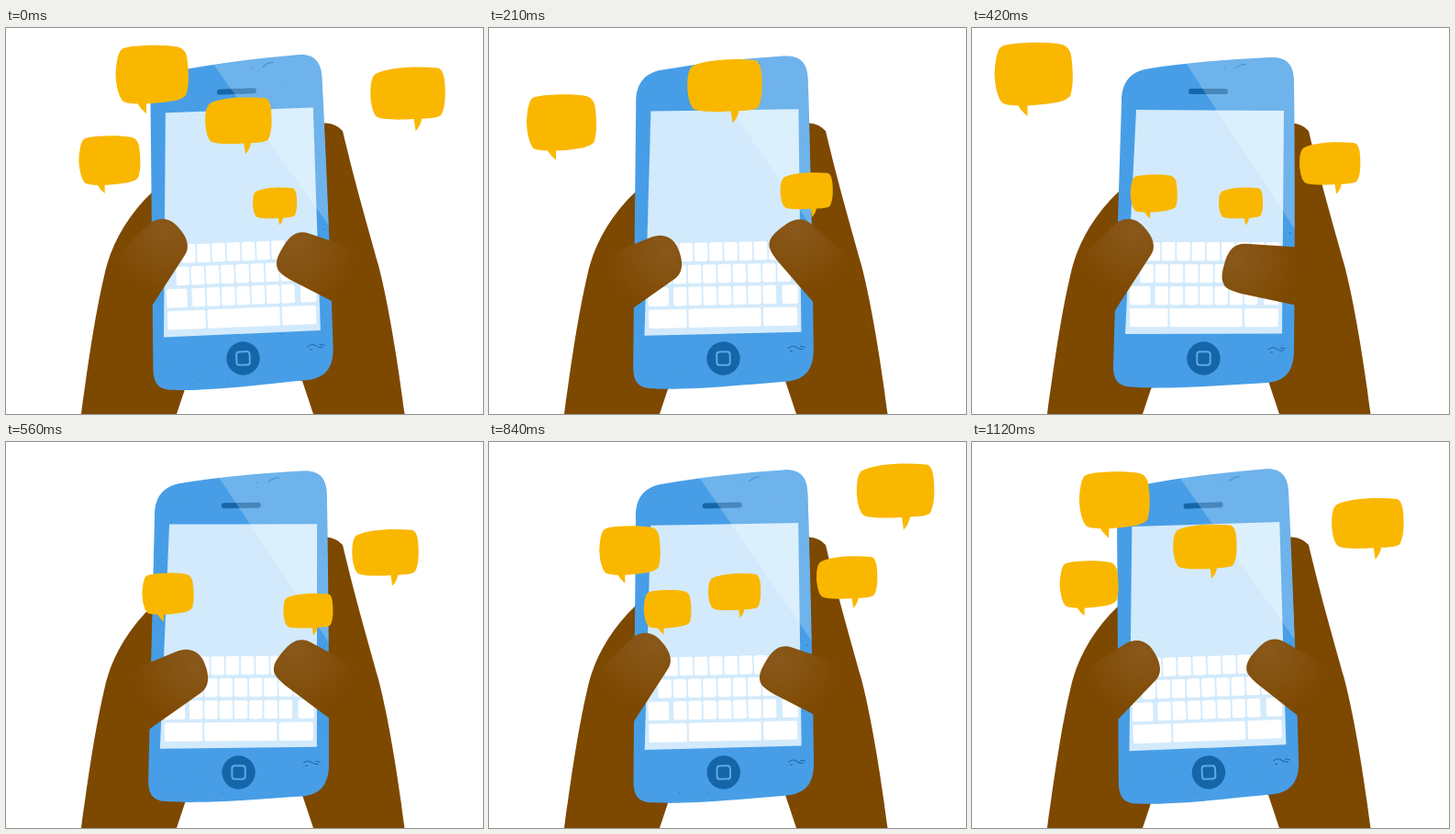
An HTML page for the animation above (1.19 s loop, 520x420 px).

```html
<!DOCTYPE html>
<html lang="en">
<head>
<meta charset="utf-8">
<title>Texting</title>
<style>
  html, body { margin: 0; width: 100%; height: 100%; overflow: hidden; background: #fff; }
  svg { display: block; width: 520px; height: 420px; }
</style>
</head>
<body>
<svg viewBox="0 0 520 420" xmlns="http://www.w3.org/2000/svg">
  <defs>
    <radialGradient id="shadeL" gradientUnits="userSpaceOnUse" cx="176" cy="222" r="68">
      <stop offset="0" stop-color="#8a591c"/><stop offset="1" stop-color="#7d4800"/>
    </radialGradient>
    <radialGradient id="shadeR" gradientUnits="userSpaceOnUse" cx="316" cy="238" r="68">
      <stop offset="0" stop-color="#8a591c"/><stop offset="1" stop-color="#7d4800"/>
    </radialGradient>
    <path id="body" d="M163 80C163 61 171 48 191 44.500C232 38 280 34 325 32C343 31 351 40 351 58C352 150 352 250 351 350C351 373 342 384 322 386C285 388 245 391.500 205 391.500C195 392 180 391 172 390.500C160 389 154 384 154 368C157 270 160 180 163 80Z"/>
    <clipPath id="inBody"><use href="#body"/></clipPath>
    <path id="bubbleL" d="M-33 -31C-15 -35 15 -35 31 -32Q40 -29 41 -17C43 0 43 12 40 23Q38 28 25 31Q8 34 -7 34.500L-7 46Q-14 40 -17 34.500Q-32 34 -35 31Q-42 22 -43 0Q-42 -20 -38 -27Q-36 -30 -33 -31Z"/>
    <path id="bubbleR" d="M-36 -23C-22 -30 8 -32 34 -29.500Q41 -28 42 -11C43 4 42 16 38 23Q35 27 16 27.500Q15 35 9 41.500L7 28C-10 29 -25 29 -33 26.500Q-40 24 -42 4Q-43 -19 -36 -23Z"/>
  </defs>

  <g fill="#7d4800">
    <path d="M82 420C90 360 98 308 107 270C113 240 130 206 160 178H200V385L195 393L186 420Z"/>
    <path d="M434.500 420C428 370 418 305 406.500 260C396 222 382 175 367 112Q360 104 349 103.500H330L300 380L323 384L335 420Z"/>
  </g>

  <g id="phone">
    <use href="#body" fill="#479ee6"/>
    <g clip-path="url(#inBody)">
      <g id="specks" fill="#1f74bd"/>
      <path d="M323 350q5 -4 9 -1t8 2M336 348l6 1M325 353h3" fill="none" stroke="#1a68b0"/>
      <path d="M179 89L340 90L338 332.500L167 333Z" fill="#d2eafc"/>
      <rect x="236" y="66" width="43" height="6" rx="2.5" fill="#1667aa"/>
      <path d="M233 38L352 219V20H233Z" fill="#fff" opacity=".21"/>
      <path d="M287 44q5 -5 12 -5" fill="none" stroke="#3d8fd8"/>
    </g>
    <g id="keys" fill="#fff"/>
    <circle cx="252.5" cy="359.5" r="18.2" fill="#1566a8"/>
    <rect x="245.3" y="352.3" width="14.4" height="14.4" rx="3" fill="none" stroke="#5aa9ea" stroke-width="2"/>
  </g>

  <path id="thumbL" fill="url(#shadeL)" d="M118 250L155 214C163 207 174 205 184 213C198 226 201 238 195 247L160 301L147 322L118 300Z"/>
  <path id="thumbR" fill="url(#shadeR)" d="M385 242L330 223.500C320 220 311 224 304 235C297 246 293 254 296 262Q298 267 310 274L355 297L375 307L395 290Z"/>
  <g id="bubbles" fill="#fab700"/>
</svg>
<script>
const STEP = 70, COUNT = 17, LIFE = 12;
const $ = id => document.getElementById(id);

function add(parent, tag, attrs) {
  const el = document.createElementNS("http://www.w3.org/2000/svg", tag);
  for (const k in attrs) el.setAttribute(k, attrs[k]);
  return parent.appendChild(el);
}

// Keyboard: four rows, 24 apart
function keys(row, x, width, n = 1) {
  for (let i = 0; i < n; i++) {
    add($("keys"), "rect", { x: x + i * 16.25, y: 233 + row * 24, width, height: 20.3, rx: 2 });
  }
}
keys(0, 174.5, 14.5, 10);
keys(1, 183.3, 14.5, 9);
keys(2, 172, 22.5);
keys(2, 199.5, 14.5, 7);
keys(2, 318, 17);
keys(3, 172, 41.5);
keys(3, 215.5, 79);
keys(3, 297, 37);

// Print texture on the casing
let seed = 11;
const rnd = () => (seed = seed * 16807 % 2147483647) / 2147483647;
for (let i = 0; i < 160; i++) {
  add($("specks"), "circle", {
    cx: 155 + rnd() * 195, cy: 36 + rnd() * 352,
    r: 0.3 + rnd() * 0.6, opacity: 0.2 + rnd() * 0.5
  });
}

// Bubbles leave from either side of the screen along cubic curves
const RIGHT = [293, 191], LEFT = [212, 184];
const SWING = [RIGHT, [369, 186], [426, 127.5], [443, 54]];
const RISE = [RIGHT, [249, 163], [248, 96.5], [259.5, 52]];
const HOOK = [LEFT, [154, 172.5], [141, 99], [159.5, 50.5]];
const DRIFT = [LEFT, [144, 179], [64.5, 127], [67.5, 50]];

function bubble(shape, start, path, end = 86) {
  return { start, path, end, el: add($("bubbles"), "use", { href: shape }) };
}
const bubbles = [
  bubble("#bubbleR", 0, SWING),
  bubble("#bubbleR", 6, SWING),
  bubble("#bubbleR", 9, RISE),
  bubble("#bubbleL", 5, HOOK, 80),
  bubble("#bubbleL", 11, DRIFT)
];

const mix = (a, b, u) => a + (b - a) * u;

// Point on a curve, by repeated mixing of its control points
function along(points, u) {
  while (points.length > 1) {
    points = points.slice(1).map((p, i) => p.map((v, j) => mix(points[i][j], v, u)));
  }
  return points[0];
}

// Straight rise to 1 at the peak and straight fall after it
const bump = (f, peak, fall = 3) => Math.max(0, 1 - (f < peak ? (peak - f) / 3 : (f - peak) / fall));

function turn(id, shift, angle, x, y) {
  $(id).setAttribute("transform", `translate(${shift} 0) rotate(${angle} ${x} ${y})`);
}

function draw(f) {
  turn("phone", 0, -2.37 * (f < 6 ? 1 - f / 6 : (f - 6) / 11), 255, 214);

  // Three taps; the left thumb stretches on the second, the right one dips before it
  const tap = 22 * (bump(f, 3) + bump(f, 9) + bump(f, 15, 2));
  const stretch = bump(f, 9), dip = bump(f, 6);
  turn("thumbL", 15 * stretch, tap + 11 * stretch, 132, 279);
  turn("thumbR", -20 * dip, tap - 15 * dip, 367, 273);

  for (const b of bubbles) {
    const u = (f - b.start + COUNT) % COUNT / LIFE;
    b.el.setAttribute("visibility", u <= 1 ? "visible" : "hidden");
    const [x, y] = along(b.path, u);
    b.el.setAttribute("transform", `translate(${x} ${y}) scale(${mix(49, b.end, u) / 86})`);
  }
}

const begin = performance.now();
function tick() {
  draw(Math.floor((performance.now() - begin) / STEP) % COUNT);
  requestAnimationFrame(tick);
}
tick();
</script>
</body>
</html>
```
